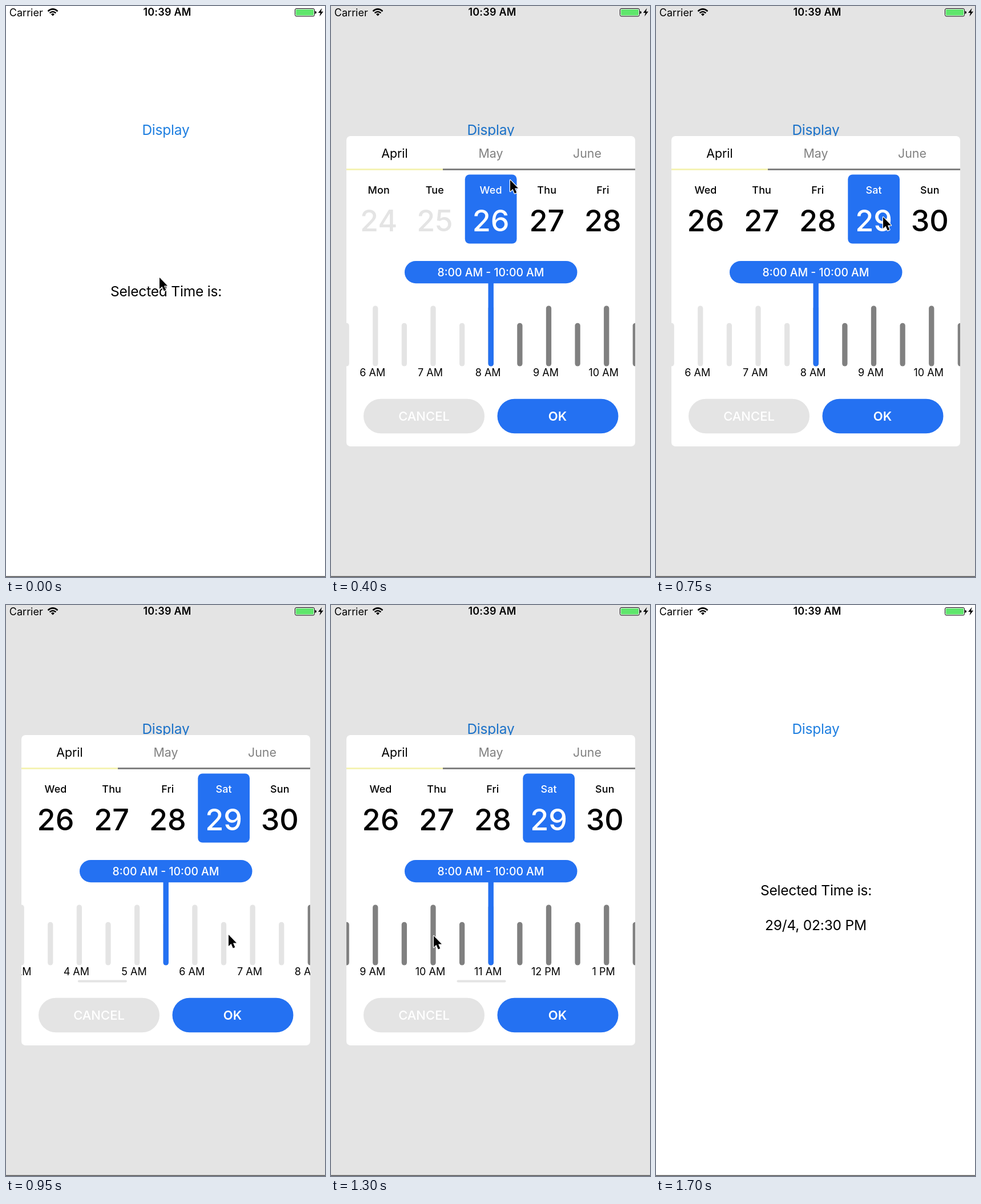
An HTML page that plays this animation: 559 by 1001 pixels, repeating every 2 s.

```html
<!DOCTYPE html>
<html lang="en">
<head>
<meta charset="utf-8">
<title>Time picker</title>
<style>
  html, body { margin: 0; width: 100%; height: 100%; overflow: hidden; background: #fff; }
  svg { display: block; width: 559px; height: 1001px; font-family: Inter, Roboto, sans-serif; }
  text { text-anchor: middle; white-space: pre; }
  .body { font-size: 24.5px; letter-spacing: -.2px; }
  .status { font-size: 18px; }
  .tab { font-size: 21.4px; fill: #808080; }
  .name { font-size: 17.9px; font-weight: 500; letter-spacing: .2px; }
  .num { font-size: 52px; font-weight: 500; }
  .hour { font-size: 18px; }
  .pill { font-size: 19.4px; font-weight: 500; fill: #fff; }
  .button { font-size: 22px; font-weight: 500; fill: #fff; }
  .blue { fill: #2471f2; }
  .pale { fill: #e4e4e4; }
  .dark { fill: #808080; }
</style>
</head>
<body>
<svg viewBox="0 0 559 1001">
  <defs>
    <clipPath id="card"><rect x="27" y="228" width="506" height="544" rx="7"/></clipPath>
  </defs>

  <text class="body" x="280" y="226" fill="#1f7fe0">Display</text>
  <text class="body" x="280.5" y="509">Selected Time is:</text>
  <text class="body" id="result" x="280" y="570">29/4, 02:30 PM</text>

  <g id="dialog">
    <rect width="559" height="1001" opacity=".106"/>
    <g clip-path="url(#card)">
      <rect x="27" y="228" width="506" height="544" fill="#fff"/>
      <text class="tab" x="111.5" y="266" style="fill:#000">April</text>
      <text class="tab" x="280" y="266">May</text>
      <text class="tab" x="449" y="266">June</text>
      <rect x="27" y="285" width="169" height="3" fill="#f5f3b4"/>
      <rect class="dark" x="196" y="285" width="337" height="3"/>
      <g id="days"></g>
      <g id="hours"></g>
      <rect class="pale" id="thumb" y="657.5" width="86" height="4" rx="2"/>
      <rect class="blue" x="275.5" y="470" width="9.4" height="161.5" rx="4.5"/>
      <rect class="blue" x="129" y="447" width="302.5" height="39.3" rx="19.6"/>
      <text class="pill" id="range" x="280" y="473.5"></text>
      <rect class="pale" x="57" y="688.7" width="212" height="60.5" rx="30.2"/>
      <text class="button" x="163" y="727">CANCEL</text>
      <rect class="blue" x="291.5" y="688.7" width="212" height="60.5" rx="30.2"/>
      <text class="button" x="397" y="727" style="font-weight:600">OK</text>
    </g>
  </g>

  <text class="status" x="35.3" y="17.5">Carrier</text>
  <g fill="none" stroke="#000" stroke-width="2.5">
    <path d="M73.5 9.2Q82 1.6 90.5 9.2M76.6 12.4Q82 7.7 87.4 12.4"/>
    <path d="M79 14.4Q82 11.8 85 14.4L82 17.6Z" fill="#000" stroke="none"/>
  </g>
  <text class="status" x="282.5" y="17.3" font-weight="600" letter-spacing=".2">10:39 AM</text>
  <rect x="506.5" y="4.5" width="34" height="13.5" rx="2.5" fill="#fff" stroke="#000"/>
  <rect x="508" y="6" width="31" height="10.5" rx="1.2" fill="#5fe66c"/>
  <path d="M541.5 8.7Q544 9 544 11.2T541.5 13.8Z"/>
  <path d="M553.6 3.8L547 12H551L549.4 18.2L556 9.8H552Z"/>
  <rect y="999.5" width="559" height="1.5" fill="#555"/>

  <path id="cursor" d="M0 0V20L4.5 15.8L7.8 23.6L11.3 22.1L8 14.5H14Z"
        stroke="#fff" stroke-width="2.4" stroke-linejoin="round" paint-order="stroke"/>
</svg>

<script>
const $ = id => document.getElementById(id);
const LOOP = 2000, STEP = 50;
const DAY_W = 98.2, HOUR_W = 101.25, MID = 280;

// Tracks: [time, value...] with straight lines between the points.
const pointer = [
  [0, 269, 476], [100, 290, 228], [250, 290, 228], [550, 338, 382],
  [650, 200, 385], [750, 398, 370], [850, 230, 580], [950, 390, 578],
  [1050, 240, 576], [1150, 320, 576], [1200, 400, 580], [1300, 180, 580],
  [1450, 400, 713], [1500, 400, 713], [1650, 189, 227]
];
const dayShift = [[200, 0], [550, 1], [650, -138], [700, -192.5]];
const midHour = [
  [850, 8], [950, 5.5], [1050, 4.5], [1150, 1.531], [1200, 1.5], [1300, 11], [1350, 14.5]
];

function sample(track, t) {
  const i = track.findIndex(p => p[0] > t);
  if (i === 0) return track[0].slice(1);
  if (i < 0) return track[track.length - 1].slice(1);
  const a = track[i - 1], b = track[i], k = (t - a[0]) / (b[0] - a[0]);
  return a.slice(1).map((v, n) => v + (b[n + 1] - v) * k);
}

function dayCells(selected) {
  const names = ["Sun", "Mon", "Tue", "Wed", "Thu", "Fri", "Sat"];
  let out = "";
  for (let d = 24; d <= 30; d++) {
    const x = 279.5 + (d - 26) * DAY_W, on = d === selected;
    if (on) out += `<rect class="blue" x="${x - 45.3}" y="295.5" width="90.7" height="121" rx="8"/>`;
    const ink = on ? "#fff" : "#000";
    out += `<text class="name" x="${x}" y="329" fill="${ink}">${names[(d + 5) % 7]}</text>`
         + `<text class="num" x="${x}" y="395" fill="${d < 26 ? "#e4e4e4" : ink}">${d}</text>`;
  }
  return out;
}

function hourMarks() {
  let out = "";
  for (let h = -2.5; h <= 26.5; h += .5) {
    const x = h * HOUR_W, full = h % 1 === 0, top = full ? 525.5 : 555.7;
    const tone = h >= 8 && h <= 15 ? "dark" : "pale";
    out += `<rect class="${tone}" x="${x - 4.6}" y="${top}" width="9.3" height="${631.5 - top}" rx="4.6"/>`;
    if (full) {
      const c = (h + 24) % 24;
      out += `<text class="hour" x="${x - 5}" y="649">${c % 12 || 12} ${c < 12 ? "AM" : "PM"}</text>`;
    }
  }
  return out;
}

const show = (id, on) => $(id).setAttribute("visibility", on ? "visible" : "hidden");
const move = (id, x, y = 0) => $(id).setAttribute("transform", `translate(${x} ${y})`);

let picked = 0;
function draw(t) {
  const open = t >= 150 && t < 1500;
  $("dialog").style.display = open ? "" : "none";
  show("result", t >= 1500);
  show("cursor", t < 1700);
  move("cursor", ...sample(pointer, t));

  const day = t < 750 ? 26 : 29;
  if (day !== picked) $("days").innerHTML = dayCells(picked = day);
  move("days", sample(dayShift, t)[0]);

  const [hour] = sample(midHour, t);
  move("hours", MID + .2 - hour * HOUR_W);
  $("thumb").setAttribute("x", 31.3 + hour * 17.2);
  $("thumb").style.display = t > 850 && t < 1400 ? "" : "none";
  $("range").textContent = t < 1350 ? "8:00 AM - 10:00 AM" : "2:30 PM - 4:30 PM";
}

$("hours").innerHTML = hourMarks();
const start = performance.now();
function tick() {
  const t = (performance.now() - start) % LOOP;
  draw(Math.floor(t / STEP) * STEP);
  requestAnimationFrame(tick);
}
tick();
</script>
</body>
</html>
```
